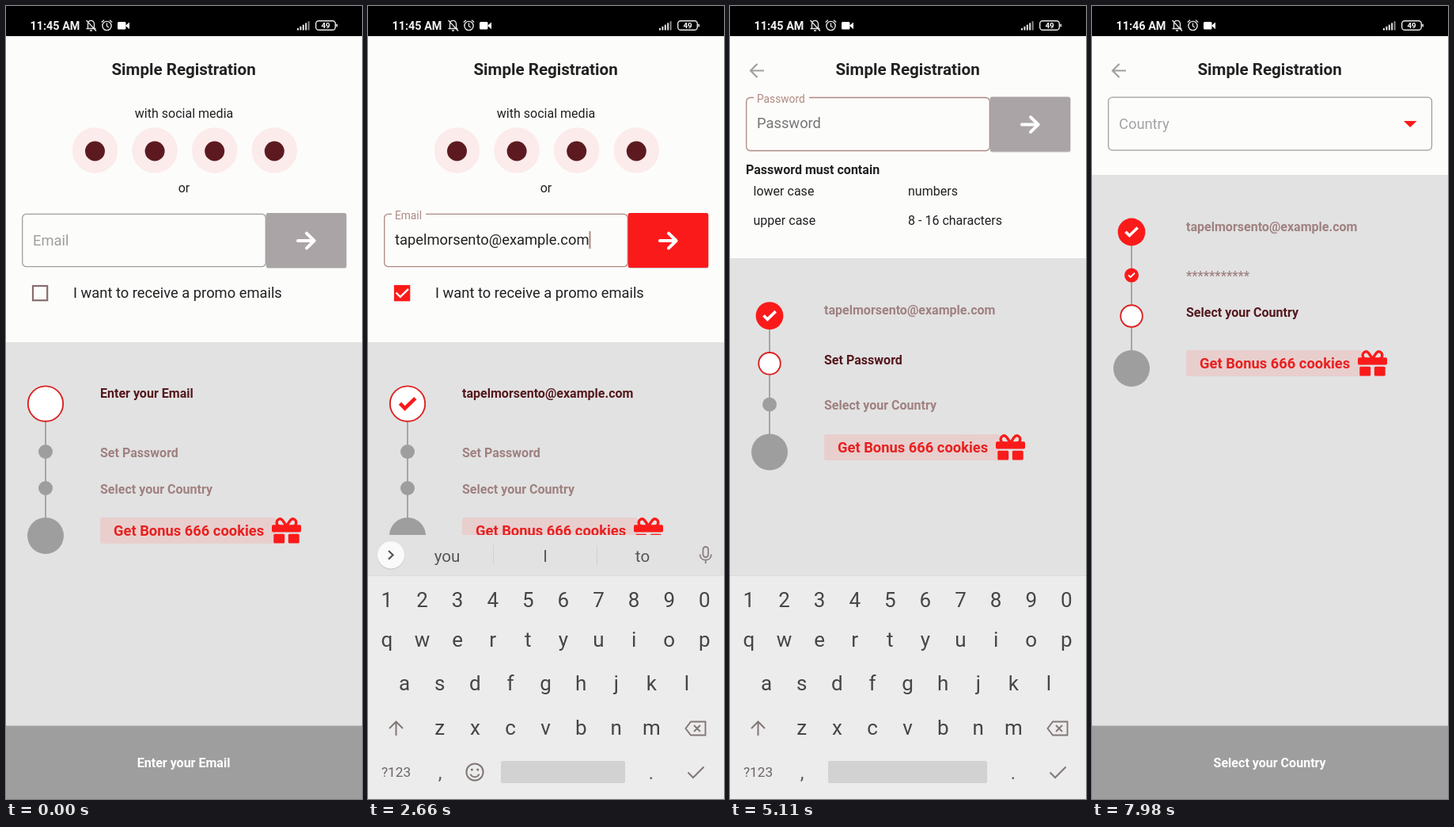
Animation, 450 px wide and 1000 px high, one loop 8000 ms. Source, as an HTML page:

```html
<!DOCTYPE html>
<html lang="en">
<head>
<meta charset="utf-8">
<title>Simple Registration</title>
<style>
  html, body { margin: 0; width: 100%; height: 100%; overflow: hidden; background: #e2e2e2; }
  svg { display: block; width: 100vw; height: 100vh; font-family: Roboto, sans-serif; }
  text { white-space: pre; }
</style>
</head>
<body>
<svg id="stage" viewBox="0 0 450 1000"></svg>
<script>
const LOOP = 8000;
const EMAIL = "tapelmorsento@example.com";
const RED = "#fb1a1a", GREY = "#9e9e9e", WINE = "#54181d", FADED = "#a08080",
      FOCUS = "#ae8880", INK = "#212121", WHITE = "#ffffff";
const stage = document.getElementById("stage");

function add(parent, tag, attrs) {
  const el = document.createElementNS("http://www.w3.org/2000/svg", tag);
  set(el, attrs || {});
  parent.appendChild(el);
  return el;
}
function set(el, attrs) {
  for (const k in attrs) el.setAttribute(k, attrs[k]);
}
const group = (p, attrs) => add(p, "g", attrs);
const rect = (p, x, y, width, height, fill, more) =>
  add(p, "rect", { x, y, width, height, fill, ...more });
const circle = (p, cx, cy, r, fill, more) => add(p, "circle", { cx, cy, r, fill, ...more });
const line = (p, d, stroke, w, more) =>
  add(p, "path", { d, stroke, "stroke-width": w, fill: "none", ...more });
function label(p, x, y, str, size, fill, more) {
  const el = add(p, "text", { x, y, "font-size": size, fill, ...more });
  el.textContent = str;
  return el;
}
const MID = { "text-anchor": "middle" };
const BOLD = { "font-weight": 700 }, SEMI = { "font-weight": 600 };
const ROUND = { "stroke-linecap": "round", "stroke-linejoin": "round" };

const lerp = (a, b, k) => a + (b - a) * k;
const clamp = v => Math.max(0, Math.min(1, v));
function ease(t, from, to) {
  const k = clamp((t - from) / (to - from));
  return k * k * (3 - 2 * k);
}
function mix(a, b, k) {
  const part = (c, i) => parseInt(c.slice(i, i + 2), 16);
  return `rgb(${[1, 3, 5].map(i => Math.round(lerp(part(a, i), part(b, i), k))).join()})`;
}
const show = (el, on) => el.setAttribute("visibility", on ? "inherit" : "hidden");

// Progress steps
rect(stage, 0, 0, 450, 1000, "#e2e2e2");
const rail = line(stage, "", "#a9a5a5", 2);
// Each row: circle y, radius and label baseline on the three pages.
const layout = [
  { y: [501.6, 390.6, 285], r: [22.2, 17.4, 17.4], base: [494, 389, 283.5] },
  { y: [562, 450.8, 339.6], r: [9, 13.8, 9], base: [568.5, 452, 346] },
  { y: [608, 502.5, 391], r: [9, 9, 13.8], base: [614.5, 509, 392] },
  { y: [668, 562.5, 457], r: [23, 23, 23], base: [0, -105, -211] }
];
const steps = layout.map((row, i) => {
  const dot = circle(stage, 50, 0, 1, GREY);
  const tick = line(stage, "M-9.6 -0.4L-3.4 5.8L9.8 -7", RED, 4.6);
  const text = label(stage, 119, 0, "", 16.04, FADED, BOLD);
  return { ...row, dot, tick, text };
});
const bonus = group(stage);
rect(bonus, 119, 645, 222, 33, "#e8cfce", { rx: 3 });
label(bonus, 136, 667.5, "Get Bonus 666 cookies", 18.33, "#e82020", BOLD);
rect(bonus, 336, 654.3, 37, 9.3, RED, { rx: 1.8 });
rect(bonus, 338.3, 665.8, 13.9, 11.7, RED, { rx: 1.5 });
rect(bonus, 356.8, 665.8, 13.9, 11.7, RED, { rx: 1.5 });
line(bonus, "M354.5 656C351 650.5 349 646.8 346.8 646.8A4.6 4.6 0 0 0 346.8 656" +
  "M354.5 656C358 650.5 360 646.8 362.2 646.8A4.6 4.6 0 0 1 362.2 656", RED, 3.5);

// Header panel
const panel = rect(stage, 0, 38, 450, 386, "#fcfcfb");
label(stage, 224.6, 86.5, "Simple Registration", 20.62, INK, { ...MID, ...BOLD });
const pages = [0, 1, 2].map(() => group(stage));

function fieldBox(p, y, w, h) {
  return rect(p, 20.7, y, w, h, "none", { rx: 5, stroke: GREY, "stroke-width": 1.3 });
}
function goButton(p, y) {
  rect(p, 329, y + 1, 101.5, 69, "#000", { rx: 2.5, opacity: 0.18 });
  const face = rect(p, 328.7, y, 101.5, 69, "#aaa4a7", { rx: 2.5 });
  line(p, `M369 ${y + 35}H389M380 ${y + 25.6}L389.6 ${y + 35}L380 ${y + 44.4}`, WHITE, 4, ROUND);
  return face;
}
function backArrow(p) {
  line(p, "M43 81.5H27M34.5 73L26 81.5L34.5 90", "#a3a0a0", 2.2);
}

// Page 1: email
const p1 = pages[0];
label(p1, 225, 141, "with social media", 16.04, INK, MID);
for (let i = 0; i < 4; i++) {
  const x = 112.5 + i * 75.6;
  circle(p1, x, 182, 28.8, "#fcebeb");
  circle(p1, x, 183, 12.5, "#5c1a20");
}
label(p1, 225, 235, "or", 16.04, INK, MID);
const emailBox = fieldBox(p1, 262.3, 307.6, 66.4);
const emailGap = rect(p1, 30, 260, 43, 5, "#fcfcfb");
const emailHint = label(p1, 34, 302, "Email", 18.33, GREY);
const emailText = label(p1, 34, 300.5, "", 18.33, INK);
const emailLine = line(p1, "", INK, 1.2);
const caret = rect(p1, 34, 284, 2, 22, FOCUS);
const emailGo = goButton(p1, 261);
const BOX_EDGE = "#896c6e";
const box = rect(p1, 34, 353, 18.2, 18.2, "none", { stroke: BOX_EDGE, "stroke-width": 2.2 });
const boxTick = line(p1, "M35.5 361.5L40.8 366.8L51 356.8", WHITE, 2.4);
label(p1, 85, 368, "I want to receive a promo emails", 18.33, INK);

// Page 2: password
const p2 = pages[1];
backArrow(p2);
fieldBox(p2, 115.5, 307.6, 67).setAttribute("stroke", FOCUS);
rect(p2, 30, 113, 70, 5, "#fcfcfb");
label(p2, 34, 122, "Password", 13.75, FOCUS);
const passHint = label(p2, 34, 154, "Password", 18.33, "#757575");
const passText = label(p2, 34, 153.5, "", 18.33, INK);
const passCaret = rect(p2, 34, 137, 2, 22, FOCUS);
const passGo = goButton(p2, 114.5);
label(p2, 20, 212, "Password must contain", 16.04, INK, BOLD);
[["lower case", 29.5, 239], ["numbers", 225, 239],
 ["upper case", 29.5, 276], ["8 - 16 characters", 225, 276]]
  .forEach(([s, x, y]) => label(p2, x, y, s, 16.04, INK));

// Page 3: country
const p3 = pages[2];
backArrow(p3);
fieldBox(p3, 115.2, 408.8, 66.6);
label(p3, 34, 155, "Country", 18.33, "#a3a3a3");
add(p3, "path", { d: "M394 145H410.5L402.2 153Z", fill: RED });

// Footer button
const footer = rect(stage, 0, 907.6, 450, 92.4, GREY);
const footText = label(stage, 225, 960, "", 16.04, WHITE, { ...MID, ...SEMI });
const footArrow = line(stage, "M274 954H291.5M287.5 949.7L292 954L287.5 958.3", WHITE, 2.1);

// Keyboard
const keyboard = group(stage);
const bar = group(keyboard);
rect(bar, 0, 667, 450, 52, "#e3e2e2");
circle(bar, 29, 693.5, 17.3, "#cfcfcf");
circle(bar, 29, 692.3, 17, "#fafafa");
line(bar, "M26 687L31.5 692.3L26 697.6", "#555", 2.2);
line(bar, "M158.5 680V705M289.5 680V705", "#d2d0d0", 1);
const words = [100, 224, 347].map(x => label(bar, x, 701, "", 20.6, "#585555", MID));
rect(bar, 423.5, 682, 6.6, 13, "none", { rx: 3.3, stroke: "#8a7f7f", "stroke-width": 1.8 });
line(bar, "M419.5 691.5C420 701 433.5 701 434 691.5M426.8 698.5V703", "#8a7f7f", 1.8);

rect(keyboard, 0, 718, 450, 282, "#ececec");
line(keyboard, "M0 718.5H450", "#dedada", 1);
const KEY_STEP = 44.6;
[["1234567890", 23.9, 757.5], ["qwertyuiop", 23.9, 808],
 ["asdfghjkl", 46.2, 863], ["zxcvbnm", 90.8, 918.5]]
  .forEach(([row, x, y]) => [...row].forEach((c, i) =>
    label(keyboard, x + i * KEY_STEP, y, c, 26, "#474545", MID)));
const GLYPH = "#827777";
line(keyboard, "M35.5 920V903M27 911L35.5 902.5L44 911", GLYPH, 2);
line(keyboard, "M401.5 911L408 902.5H426.5V919.5H408ZM412 907L420 915M420 907L412 915", GLYPH, 1.9);
label(keyboard, 35.5, 972, "?123", 17.2, "#6c6666", MID);
label(keyboard, 91, 975, ",", 24, "#5c5858", MID);
label(keyboard, 358, 975, ".", 24, "#5c5858", MID);
const spaceKey = rect(keyboard, 168, 952, 157, 28, "#d2d2d2", { rx: 2 });
line(keyboard, "M404.5 966.5L411 973L424.5 959.5", GLYPH, 2);
const smiley = group(keyboard);
circle(smiley, 135, 966, 10.6, "none", { stroke: GLYPH, "stroke-width": 2 });
circle(smiley, 131.3, 963, 1.6, GLYPH);
circle(smiley, 138.7, 963, 1.6, GLYPH);
line(smiley, "M129.5 968.5C131.5 973.5 138.5 973.5 140.5 968.5", GLYPH, 2);

// Status bar
rect(stage, 0, 0, 450, 38, "#000000");
const clock = label(stage, 30.5, 30, "", 14.4, "#f4f4f4", BOLD);
const LIGHT = "#e8e8e8";
line(stage, "M101.5 28.5H113.5M103.5 28V22.5C104 17 111 17 111.5 22.5V28M106 31H109M101.5 18L114 31.5", LIGHT, 1.3);
circle(stage, 127.5, 25, 5.6, "none", { stroke: LIGHT, "stroke-width": 1.4 });
line(stage, "M127.5 21.5V25.5L130 27M120.8 20.5L124 17.8M134.2 20.5L131 17.8", LIGHT, 1.3);
rect(stage, 141, 20, 10.5, 9.6, WHITE, { rx: 1.5 });
add(stage, "path", { d: "M151 24.8L156 20.5V29.2Z", fill: WHITE });
for (let i = 0; i < 5; i++)
  rect(stage, 368 + i * 3.4, 28 - i * 2.2, 2, 2.5 + i * 2.2, i < 4 ? LIGHT : "#8a8a8a");
rect(stage, 391.7, 18.7, 24.6, 11.6, "none", { rx: 3.5, stroke: LIGHT, "stroke-width": 1.4 });
rect(stage, 417.4, 22.5, 1.6, 4, LIGHT, { rx: 0.8 });
label(stage, 404, 28.2, "49", 9.8, WHITE, { ...MID, ...BOLD });

function suggestions(n) {
  if (n === 0 || n > 13) return ["you", "I", "to"];
  return n < 4 ? ["tap", "rap", "Top"] : ["tape", "taper", "Top"];
}
// Value of a three-entry row at a fractional page number.
function at(row, page) {
  const i = Math.min(1, Math.floor(page));
  return lerp(row[i], row[i + 1], page - i);
}

function drawEmail(t, n, valid) {
  const float = ease(t, 290, 450);
  const focused = t > 290 && t < 3180;
  const tone = focused ? FOCUS : GREY;
  set(emailBox, { stroke: tone });
  show(emailGap, float > 0.6);
  set(emailHint, { y: lerp(302, 269, float), "font-size": lerp(18.33, 13.75, float), fill: tone });
  emailText.textContent = EMAIL.slice(0, n);
  const width = n ? emailText.getComputedTextLength() : 0;
  set(emailLine, { d: n && n < 14 ? `M34 303.5H${34 + width}` : "" });
  set(caret, { x: 34 + width });
  show(caret, focused && t % 1000 >= 400);
  set(emailGo, { fill: valid && focused ? RED : "#aaa4a7" });
  const checked = t >= 2400;
  set(box, { fill: checked ? RED : "none", stroke: checked ? RED : BOX_EDGE });
  show(boxTick, checked);
}

function drawPassword(t, n, valid) {
  show(passHint, n === 0);
  passText.textContent = "•".repeat(n);
  set(passCaret, { x: 34 + (n ? passText.getComputedTextLength() : 0) });
  show(passCaret, t < 7200 && t % 1000 >= 400);
  set(passGo, { fill: valid ? RED : "#aaa4a7" });
}

function drawSteps(page, done, names) {
  set(rail, { d: `M50 ${at(layout[0].y, page)}V${at(layout[3].y, page)}` });
  steps.forEach((s, i) => {
    const y = at(s.y, page), r = at(s.r, page);
    const active = i < 3 ? clamp(1 - Math.abs(page - i)) : 0;
    const past = i < 3 && page > i;
    const rest = past ? RED : GREY;
    set(s.dot, {
      cy: y, r, fill: mix(rest, WHITE, active),
      stroke: mix(rest, "#dc2222", active), "stroke-width": 1.9 * active
    });
    set(s.tick, {
      transform: `translate(50 ${y}) scale(${r / 22.2})`,
      stroke: mix(WHITE, RED, active)
    });
    show(s.tick, done[i]);
    if (i === 3) return;
    s.text.textContent = names[i];
    set(s.text, { y: at(s.base, page), fill: mix(FADED, WINE, active) });
  });
  set(bonus, { transform: `translate(0 ${at(layout[3].base, page)})` });
}

function render(t) {
  const page = ease(t, 4340, 4680) + ease(t, 7480, 7820);
  const typed = Math.max(0, Math.min(EMAIL.length, Math.floor((t - 715) / 60)));
  const secret = Math.max(0, Math.min(11, Math.floor((t - 5400) / 105)));
  const validEmail = typed >= 24, validPass = secret >= 8;

  clock.textContent = t < 5900 ? "11:45 AM" : "11:46 AM";
  set(panel, { height: at([386, 280, 175], page) });
  pages.forEach((p, i) => {
    const k = clamp(1 - 2 * Math.abs(page - i));
    set(p, { opacity: k });
    show(p, k > 0);
  });
  drawEmail(t, typed, validEmail);
  drawPassword(t, secret, validPass);

  const names = [validEmail ? EMAIL.slice(0, typed) : "Enter your Email",
    secret ? "*".repeat(secret) : "Set Password", "Select your Country"];
  drawSteps(page, [validEmail, validPass, false], names);

  const current = Math.round(page);
  const ready = [validEmail, validPass, false][current];
  set(footer, { fill: ready ? RED : GREY });
  footText.textContent = ready ? "Tap to continue" : names[current];
  set(footText, { x: ready ? 209 : 224.6 });
  show(footArrow, ready);

  const first = t < 4300;
  const up = first
    ? ease(t, 330, 580) - ease(t, 3200, 3430)
    : ease(t, 4620, 4880) - ease(t, 7220, 7450);
  set(keyboard, { transform: `translate(0 ${(1 - up) * 336})` });
  show(keyboard, up > 0);
  show(bar, first);
  show(smiley, first);
  set(spaceKey, { x: first ? 168 : 124, width: first ? 157 : 201 });
  suggestions(typed).forEach((w, i) => { words[i].textContent = w; });
}

const start = performance.now();
function tick() {
  render((performance.now() - start) % LOOP);
  requestAnimationFrame(tick);
}
tick();
</script>
</body>
</html>
```
